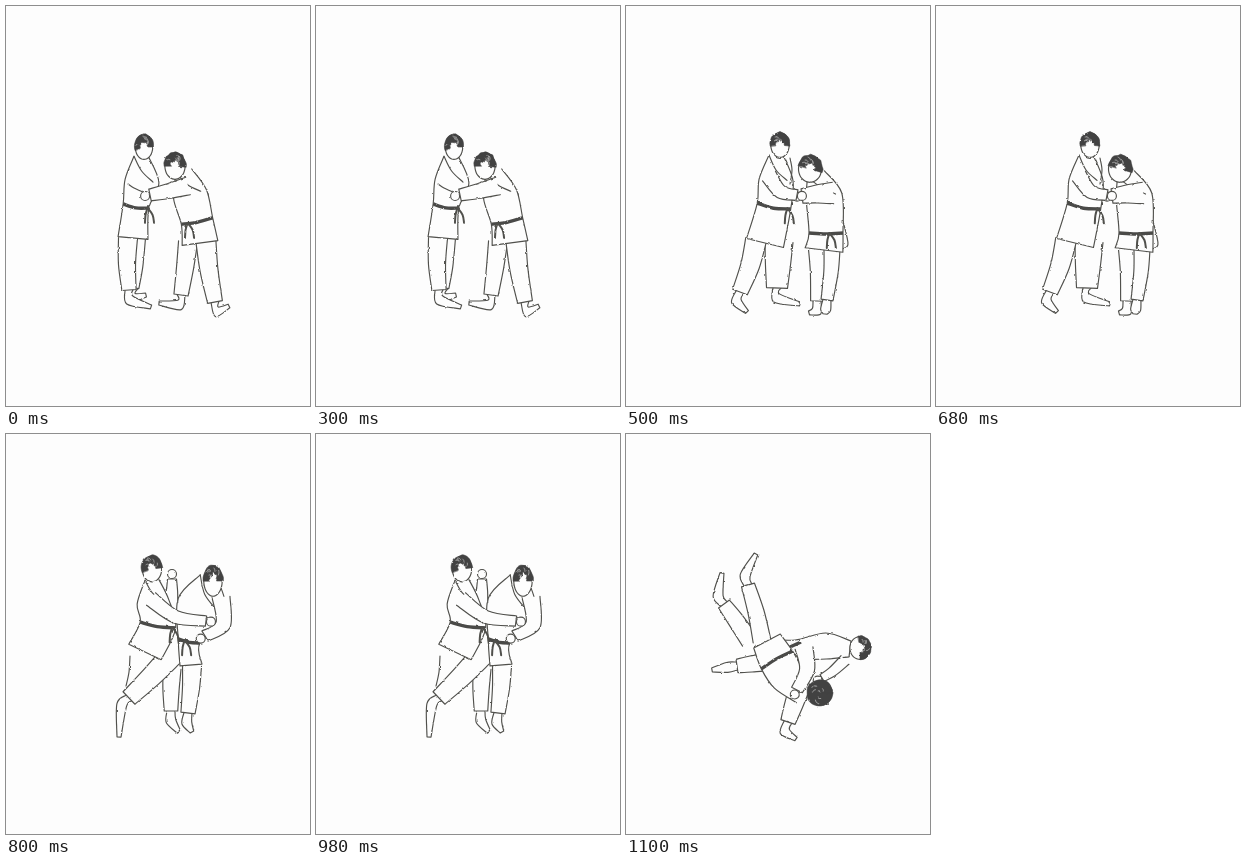
An HTML page for the animation above (1400 ms loop, 304x400 px).

```html
<!DOCTYPE html>
<html lang="en">
<head>
<meta charset="utf-8">
<title>Judo throw</title>
<style>
  html, body { margin: 0; width: 100%; height: 100%; overflow: hidden; background: #fdfdfd; }
  svg { display: block; width: 100%; height: 100%; }
  path { fill: none; stroke: #50504c; stroke-width: 1.15; stroke-linecap: round; stroke-linejoin: round; }
  .cloth { fill: #fdfdfd; }
  .belt { stroke: #4a4a48; stroke-width: 3.4; stroke-linecap: butt; }
  .tail { stroke-width: 2; }
  .hair { fill: #424242; stroke: #424242; stroke-width: .6; }
  .shine { stroke: #b4b4b4; stroke-width: .8; }
</style>
</head>
<body>
<svg id="stage" viewBox="0 0 304 400">
  <filter id="ink" filterUnits="userSpaceOnUse" x="0" y="0" width="304" height="400" color-interpolation-filters="sRGB">
    <feTurbulence type="fractalNoise" baseFrequency=".22" numOctaves="2" seed="4"/>
    <feDisplacementMap in="SourceGraphic" scale="2.2" xChannelSelector="R" yChannelSelector="G"/>
    <feGaussianBlur stdDeviation=".3"/>
  </filter>
</svg>
<script>
const SVG = 'http://www.w3.org/2000/svg';
const stage = document.getElementById('stage');
let layer;

function add(parent, tag, attrs) {
  const node = document.createElementNS(SVG, tag);
  for (const key in attrs) node.setAttribute(key, attrs[key]);
  return parent.appendChild(node);
}
const draw = (d, name = 'cloth') => add(layer, 'path', { d, class: name });

function randomFrom(seed) {
  return () => (seed = (seed * 16807) % 2147483647) / 2147483647;
}

const clampAt = (list, i) => list[Math.max(0, Math.min(list.length - 1, i))];
const mix = (a, b, t) => [a[0] + (b[0] - a[0]) * t, a[1] + (b[1] - a[1]) * t];

// Smooth curve through points (Catmull-Rom to Bezier).
function curve(points, start = 'M') {
  const handle = (i, sign) => points[i].map((v, k) =>
    v + sign * (clampAt(points, i + 1)[k] - clampAt(points, i - 1)[k]) / 6);
  return points.slice(1).reduce(
    (d, p, i) => `${d}C${handle(i, 1)} ${handle(i + 1, -1)} ${p}`,
    start + points[0]);
}

// Tapered tube around a centre line, open at its first end.
function tube(spine, widths) {
  const edge = sign => spine.map(([x, y], i) => {
    const a = clampAt(spine, i - 1), b = clampAt(spine, i + 1);
    const dx = b[0] - a[0], dy = b[1] - a[1], k = sign * widths[i] / Math.hypot(dx, dy);
    return [x - dy * k, y + dx * k];
  });
  const left = edge(1), right = edge(-1);
  draw(curve(left) + curve([...right].reverse(), 'L'));
  return { left, right };
}

function leg(hip, knee, ankle, toe, size = 1) {
  const shin = Math.hypot(ankle[0] - knee[0], ankle[1] - knee[1]);
  tube([ankle, mix(knee, ankle, 1 + 10 / shin), toe], [4, 5, 2]);
  tube([hip, knee, ankle], [10, 9, 7.5].map(w => w * size));
}

function arm(shoulder, elbow, wrist, size = 1) {
  const fore = Math.hypot(wrist[0] - elbow[0], wrist[1] - elbow[1]);
  const [x, y] = mix(elbow, wrist, 1 + 5 / fore), r = 4.5;
  draw(`M${x - r} ${y}a${r} ${r} 0 1 1 ${2 * r} 0a${r} ${r} 0 1 1 ${-2 * r} 0`);
  tube([shoulder, elbow, wrist], [9, 7.5, 6].map(w => w * size));
}

// Jacket from neck to hem; the belt crosses it at the waist, its ends hang from the knot.
function jacket(spine, widths, knot) {
  const { left, right } = tube(spine, widths);
  const ends = [left[2], right[2]];
  const middle = mix(mix(...ends, .5), spine[3], .06);
  draw(curve([ends[0], middle, ends[1]]), 'belt');
  if (knot === undefined) return;
  const [x, y] = mix(...ends, knot);
  for (const swing of [-2, 5]) draw(curve([[x, y], [x + swing, y + 7], [x + swing * 1.3, y + 15]]), 'tail');
  draw(curve([left[0], mix(spine[0], spine[1], .6), mix(spine[1], right[1], .65)]));
}

// Oval face with a ragged cap of hair between two angles in degrees.
function head([x, y], rx, ry, from, to) {
  const random = randomFrom(Math.round(x * y));
  const at = (t, r) => {
    const angle = (from + (to - from) * t) * Math.PI / 180;
    return [x + rx * r * Math.cos(angle), y + ry * r * Math.sin(angle)];
  };
  const inner = .75 * (1 - (to - from) / 360);
  const steps = Array.from({ length: 15 }, (_, i) => i / 14);
  draw(curve(Array.from({ length: 25 }, (_, i) => {
    const angle = i * Math.PI / 12;
    return [x + rx * .92 * Math.cos(angle), y + ry * .95 * Math.sin(angle)];
  })));
  const outer = steps.map(t => at(t, .96 + .1 * random()));
  const fringe = steps.map(t => at(1 - t, inner * (.8 + .6 * random())));
  draw(curve(outer) + 'L' + fringe.join('L') + 'Z', 'hair');
  for (let i = 0; i < 7; i++) {
    const t = .1 + .75 * random(), r = inner + (.95 - inner) * random();
    draw(curve([at(t, r), at(t + .05, r * .9), at(t + .08, r * .75)]), 'shine');
  }
}

const fold = (...points) => draw(curve(points), 'fold');

function grip() {
  leg([133, 232], [131, 260], [128, 282], [140, 289], .65);
  leg([122, 232], [121, 258], [123, 284], [145, 301], .95);
  jacket([[135, 150], [136, 175], [130, 200], [127, 232]], [7, 17, 13, 15], .95);
  fold([122, 178], [128, 182], [137, 186]);
  head([138, 141], 9.5, 13, 165, 360);

  leg([182, 236], [179, 262], [175, 289], [153, 297], .95);
  leg([200, 236], [203, 264], [209, 296], [223, 300]);
  jacket([[178, 165], [184, 188], [191, 215], [194, 237]], [8, 17, 16, 18], .2);
  arm([182, 180], [163, 185], [144, 189]);
  head([169, 160], 11, 14, 180, 365);
}

function step() {
  leg([153, 236], [152, 258], [151, 282], [174, 298], 1.4);
  leg([130, 234], [124, 260], [114, 286], [121, 306], 1.05);
  jacket([[150, 149], [150, 174], [148, 200], [139, 237]], [7, 17, 17, 19], .9);
  head([154, 139], 10, 13, 175, 365);

  leg([191, 243], [192, 266], [191, 295], [183, 307], .85);
  leg([206, 243], [205, 266], [201, 294], [199, 308], .8);
  fold([217, 215], [222, 238], [216, 243]);
  jacket([[190, 168], [198, 190], [200, 227], [198, 244]], [9, 18, 17, 19], .6);
  arm([207, 187], [191, 188], [176, 190], 1.2);
  arm([143, 170], [155, 186], [171, 189], .9);
  fold([164, 152], [166, 164], [164, 178]);
  head([184, 163], 12.5, 14, 195, 375);
}

function turn() {
  leg([166, 235], [165, 256], [165, 277], [173, 298], .9);
  leg([186, 232], [185, 254], [182, 279], [186, 298], .95);
  jacket([[203, 143], [196, 172], [183, 207], [185, 231]], [9, 25, 11, 11], .3);
  arm([215, 163], [217, 191], [199, 202]);
  head([207, 147], 10, 16, 180, 360);

  fold([124, 222], [123, 238], [120, 252]);
  arm([165, 168], [166, 157], [166, 145], .75);
  leg([165, 222], [146, 242], [123, 264], [113, 303], 1.15);
  jacket([[146, 146], [147, 168], [152, 191], [139, 218]], [7, 16, 18, 18], .9);
  arm([145, 165], [170, 183], [200, 187], .85);
  head([146, 135], 10.5, 13.5, 165, 355);
}

function fall() {
  tube([[140, 217], [170, 216], [200, 212], [224, 215]], [12, 10, 13, 8]);
  arm([219, 226], [206, 238], [196, 244], .65);
  head([234, 214], 11, 12, -100, 90);

  leg([140, 228], [125, 230], [111, 232], [86, 236], .9);
  leg([172, 258], [167, 273], [162, 288], [170, 305]);
  jacket([[178, 262], [162, 244], [151, 226], [141, 207]], [10, 17, 18, 15]);
  leg([124, 207], [109, 185], [98, 170], [96, 139], .9);
  leg([136, 207], [130, 178], [122, 151], [130, 120], .9);
  draw(curve([[164, 213], [175, 208]]), 'belt');
  arm([178, 214], [181, 236], [171, 256]);
  head([194, 259], 13, 13, 0, 360);
}

const scenes = [[grip, 500], [step, 300], [turn, 300], [fall, 300]];
const duration = scenes.reduce((sum, [, hold]) => sum + hold, 0);
let start = 0;

for (const [pose, hold] of scenes) {
  layer = add(stage, 'g', { filter: 'url(#ink)' });
  pose();
  const steps = [
    { offset: start / duration, opacity: 1 },
    { offset: (start + hold) / duration, opacity: 0 }
  ];
  if (start > 0) steps.unshift({ offset: 0, opacity: 0 });
  if (start + hold < duration) steps.push({ offset: 1, opacity: 0 });
  layer.animate(steps.map(s => ({ ...s, easing: 'step-end' })), { duration, iterations: Infinity });
  start += hold;
}
</script>
</body>
</html>
```
